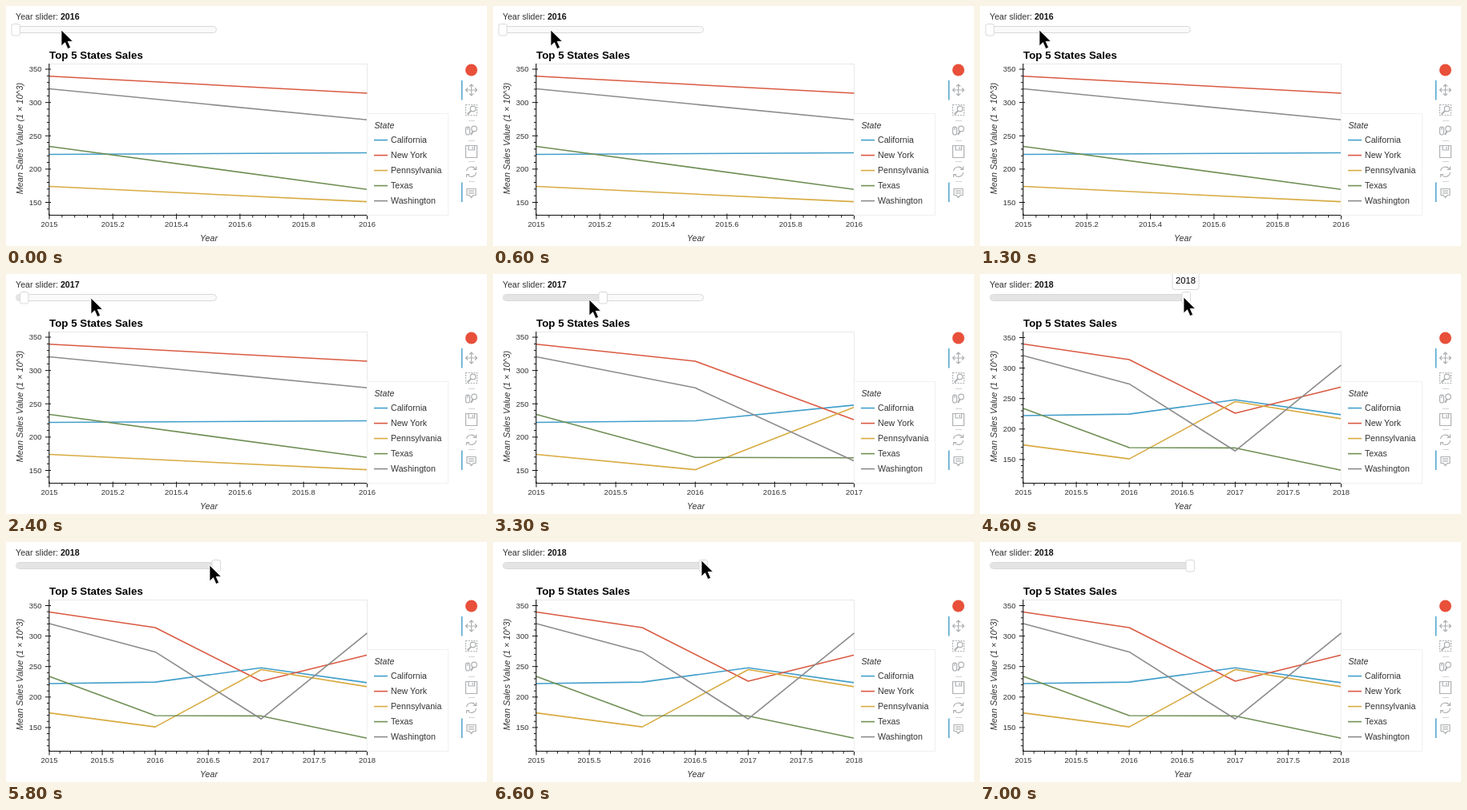
An HTML page that plays this animation: 600 by 300 pixels, repeating every 8100 ms.

```html
<!DOCTYPE html>
<html lang="en">
<head>
<meta charset="utf-8">
<title>Top 5 States Sales</title>
<style>
  html, body { margin: 0; width: 100%; height: 100%; overflow: hidden; background: #fff; }
  svg { display: block; width: 600px; height: 300px; }
  text { font: 10.67px "Liberation Sans", Arial, sans-serif; fill: #333; }
  .title { font-size: 13.33px; font-weight: bold; fill: #000; }
  .italic { font-style: italic; }
  .y-title { font-size: 10.85px; }
  #labels text { font-size: 9.5px; }
  #tip text { font-size: 11.2px; fill: #000; }
  .icon { fill: none; stroke: #adb0b2; stroke-width: 1.2; }
</style>
</head>
<body>
<svg viewBox="0 0 600 300">
  <rect width="600" height="300" fill="#fff"/>

  <text x="12" y="17">Year slider: <tspan id="value" font-weight="bold" fill="#111">2016</tspan></text>
  <rect x="12.5" y="25.5" width="250" height="8" rx="4" fill="#fafafa" stroke="#d9d9d9"/>
  <rect id="fill" x="13" y="26" height="7" rx="3.5" fill="#e4e4e4"/>
  <rect id="handle" x="-5" y="22.5" width="10.5" height="14.5" rx="2.5" fill="#fff" stroke="#d9d9d9"/>

  <text class="title" x="54" y="65.5">Top 5 States Sales</text>
  <path d="M54 72.5H450.5V261.5" fill="none" stroke="#e8e8e8"/>
  <g id="lines" fill="none" stroke-width="1.6" stroke-linejoin="round"></g>
  <path d="M53.8 72V261.5H451" fill="none" stroke="#111" stroke-width="1.1"/>
  <path id="ticks" fill="none" stroke="#111"/>
  <g id="labels"></g>
  <text class="italic" x="253" y="293.5" text-anchor="middle">Year</text>
  <text class="italic y-title" transform="translate(20.5 165.5) rotate(-90)" text-anchor="middle">Mean Sales Value (1 × 10^3)</text>

  <g id="legend">
    <rect x="450.5" y="134.5" width="101" height="127" fill="#fff" fill-opacity=".95" stroke="#f1f1f1"/>
    <text class="italic" x="459.5" y="153">State</text>
  </g>

  <circle cx="580.5" cy="80" r="7.5" fill="#e8503a"/>
  <path d="M568.7 93V117.500M568.7 220.500V245" stroke="#4ba3c9" stroke-width="1.5"/>
  <path d="M577 143.500H585M577 168.500H585M577 194.500H585M577 219.500H585" stroke="#d4d4d4"/>
  <g class="icon">
    <path d="M573.500 105H587.500M580.500 98V112M578 100.500L580.500 98L583 100.500M578 109.500L580.500 112L583 109.500M576 102.500L573.500 105L576 107.500M585 102.500L587.500 105L585 107.500"/>
    <rect x="573.500" y="123.500" width="14" height="13" stroke-dasharray="2 1.3"/>
    <circle cx="582.500" cy="128.500" r="3.300"/>
    <path d="M580 131L575.500 135.500" stroke-width="2"/>
    <circle cx="584" cy="153.500" r="3.300"/>
    <path d="M582.500 156.500L580 161" stroke-width="2"/>
    <rect x="573.500" y="151" width="5" height="10" rx="2.500"/>
    <path d="M576 151V155"/>
    <path d="M573.500 174.500H587.500V189.500H573.500ZM577 175V180H584.500V175M582 176V179"/>
    <path d="M574.500 206A6 6 0 0 1 585.500 204M586.500 208A6 6 0 0 1 575.500 210.500M586.500 200.500V204.500H582.500M574.500 214V210.500H578.500"/>
    <path d="M575 228.500H586V236.500H583L580.500 239.500L578 236.500H575ZM577 231.200H584M577 233.800H584"/>
  </g>

  <g id="tip">
    <rect x="-17" y="-4" width="33" height="23.500" rx="3" fill="#fff" stroke="#d9d9d9"/>
    <text x="-.5" y="11.500" text-anchor="middle">2018</text>
  </g>
  <path id="cursor" d="M0 0V20L4.600 15.700L8 23.500L11.600 22L8.200 14.300H14.500Z" fill="#000" stroke="#fff" stroke-width=".8"/>
</svg>
<script>
const LOOP = 8100;
const LEFT = 54, RIGHT = 450.5, BOTTOM = 261.5;
const SERIES = [
  { name: "California", color: "#429fca", sales: [222, 224.5, 248, 223.5] },
  { name: "New York", color: "#da5a42", sales: [339.5, 314, 226, 269] },
  { name: "Pennsylvania", color: "#d8ab42", sales: [174, 151, 245, 217] },
  { name: "Texas", color: "#6f8f55", sales: [234, 169.5, 169, 132.5] },
  { name: "Washington", color: "#8c8c8c", sales: [320.5, 274, 164, 305] }
];
// Each row: start time, then the state held until the next row.
const CURSOR = [
  [0, 69, 30], [300, 70, 30], [500, 71, 30], [600, 72, 30], [900, 73, 30], [1300, 74, 30],
  [1500, 78, 30], [1800, 84, 30], [2000, 94, 30], [2100, 106, 30],
  [2900, 110, 31], [3000, 115, 32], [3300, 120, 32],
  [3500, 135, 32], [3800, 174, 31], [3900, 214, 30], [4100, 254, 29],
  [6600, 260, 23], [6800, 273, 4], [7000, 273, -40]
];
const HANDLE = [[0, 12], [2400, 22.5], [2600, 137], [4600, 257], [4800, 262]];
const YEAR = [[0, 2016], [2400, 2017], [4600, 2018]];
const CHART = [[0, 2016], [2600, 2017], [4600, 2018]];

const $ = id => document.getElementById(id);
const held = (track, t) => track.findLast(row => row[0] <= t).slice(1);

function add(parent, tag, attrs, text = "") {
  const el = document.createElementNS("http://www.w3.org/2000/svg", tag);
  for (const key in attrs) el.setAttribute(key, attrs[key]);
  el.textContent = text;
  parent.append(el);
  return el;
}

SERIES.forEach((s, i) => {
  const y = 167.6 + i * 19;
  s.path = add($("lines"), "path", { stroke: s.color });
  add($("legend"), "path", { d: `M459 ${y}H476`, stroke: s.color, "stroke-width": 1.6 });
  add($("legend"), "text", { x: 480, y: y + 3.8 }, s.name);
});

let shownYear;
function drawChart(lastYear) {
  if (lastYear === shownYear) return;
  shownYear = lastYear;
  const span = lastYear - 2015;
  const [top, scale] = span === 3 ? [79.5, 0.762] : [79, 0.8325];
  const x = year => LEFT + (year - 2015) / span * (RIGHT - LEFT);
  const y = value => top + (350 - value) * scale;

  for (const s of SERIES) {
    const points = s.sales.slice(0, span + 1).map((v, i) => `${x(2015 + i)} ${y(v)}`);
    s.path.setAttribute("d", "M" + points.join("L"));
  }

  $("labels").replaceChildren();
  let d = "";
  const step = span === 1 ? 0.2 : 0.5;
  const count = Math.round(span / step) * 5;
  for (let i = 0; i <= count; i++) {
    const year = 2015 + i * step / 5, major = i % 5 === 0;
    d += `M${x(year)} ${BOTTOM - (major ? 2 : 0)}V${BOTTOM + (major ? 5 : 3)}`;
    if (major) add($("labels"), "text", { x: x(year), y: 276, "text-anchor": "middle" }, +year.toFixed(1));
  }
  for (let v = 350; y(v) < BOTTOM; v -= 10) {
    const major = v % 50 === 0;
    d += `M${LEFT + (major ? 2 : 0)} ${y(v)}H${LEFT - (major ? 5 : 3)}`;
    if (major) add($("labels"), "text", { x: 44.5, y: y(v) + 3.4, "text-anchor": "end" }, v);
  }
  $("ticks").setAttribute("d", d);
}

function render(t) {
  const [handleX] = held(HANDLE, t);
  drawChart(held(CHART, t)[0]);
  $("value").textContent = held(YEAR, t)[0];
  $("handle").setAttribute("transform", `translate(${handleX} 0)`);
  $("fill").setAttribute("width", handleX - 12);
  $("tip").setAttribute("transform", `translate(${handleX} 0)`);
  $("tip").setAttribute("visibility", t >= 4600 && t < 5800 ? "visible" : "hidden");
  $("cursor").setAttribute("transform", `translate(${held(CURSOR, t).join(" ")})`);
}

const start = performance.now();
function tick() {
  render((performance.now() - start) % LOOP);
  requestAnimationFrame(tick);
}
tick();
</script>
</body>
</html>
```
